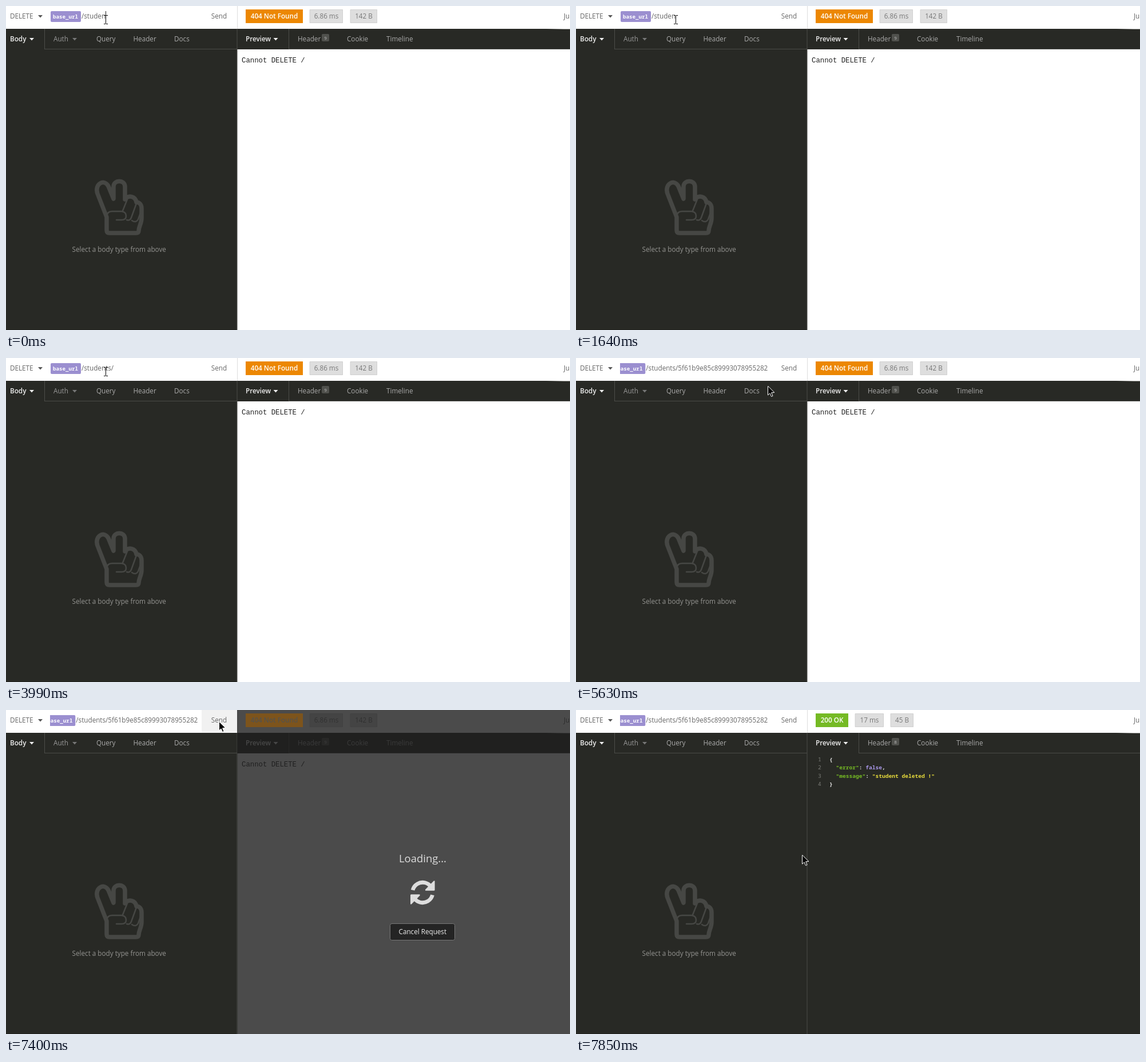
These frames come from a looping animation (986 px wide and 568 px high, 8000 ms). An HTML page with a canvas:

```html
<!DOCTYPE html>
<html lang="en">
<head>
<meta charset="utf-8">
<title>REST client: delete request</title>
<style>
html, body { margin: 0; width: 100%; height: 100%; overflow: hidden; background: #fff; }
canvas { display: block; }
</style>
</head>
<body>
<canvas id="stage" width="986" height="568"></canvas>
<script>
const ctx = document.getElementById('stage').getContext('2d');
const LOOP = 8000, SENT = 7400, DONE = 7850, PASTED = 4850;
const SANS = '"Open Sans", "Noto Sans", sans-serif';
const MONO = '"Noto Sans Mono", "DejaVu Sans Mono", monospace';
const UI = `11.7px ${SANS}`, UI_BOLD = `600 11.7px ${SANS}`;
const DARK = '#282925', LINE = '#4b4c48';

const typed = [
  [0, '/studen'], [2070, '/students'], [3550, '/students/'],
  [PASTED, '/students/5f61b9e85c89993078955282']
];
const caretOn = [
  [0, 620], [1050, 1640], [2070, 2650], [3110, 3990],
  [4850, 5330], [5780, 6380], [6810, 7400]
];
const pointer = [
  [0, 'beam', 171, 16], [5330, 'beam', 174, 13], [5480, 'beam', 193, 17],
  [5630, 'arrow', 335, 49], [5780, 'arrow', 360, 24], [5930, 'beam', 328, 16],
  [6080, 'beam', 295, 15], [6230, 'beam', 254, 15], [6380, 'beam', 227, 15],
  [6530, 'beam', 270, 18], [6680, 'beam', 316, 19], [6810, 'arrow', 355, 24],
  [6960, 'arrow', 372, 20], [7700, 'arrow', 366, 61], [DONE, 'arrow', 395, 254]
];
const sendShade = [
  [0, '#fff'], [5780, '#fafafa'], [5930, '#fff'], [6810, '#f9f9f9'],
  [6960, '#f1f1f1'], [7700, '#f5f5f5'], [DONE, '#fff']
];

const at = (track, t) => track.filter(step => step[0] <= t).pop();

function rect(x, y, w, h, color) {
  ctx.fillStyle = color;
  ctx.fillRect(x, y, w, h);
}

function text(s, x, y, color, font = UI) {
  ctx.font = font;
  ctx.fillStyle = color;
  ctx.fillText(s, x, y);
}

function centered(s, x, y, color, font) {
  ctx.textAlign = 'center';
  text(s, x, y, color, font);
  ctx.textAlign = 'left';
}

function rounded(x, y, w, h, r, fill, stroke) {
  ctx.beginPath();
  ctx.roundRect(x, y, w, h, r);
  ctx.fillStyle = fill;
  ctx.fill();
  if (stroke) {
    ctx.strokeStyle = stroke;
    ctx.lineWidth = 1;
    ctx.stroke();
  }
}

function polygon(points, color) {
  ctx.beginPath();
  points.forEach(([x, y]) => ctx.lineTo(x, y));
  ctx.closePath();
  ctx.fillStyle = color;
  ctx.fill();
}

function dropMark(x, y, color) {
  polygon([[x - 4, y - 2], [x + 4, y - 2], [x, y + 2.5]], color);
}

function strokePath(d, width, color) {
  ctx.lineWidth = width;
  ctx.strokeStyle = color;
  ctx.lineJoin = ctx.lineCap = 'round';
  ctx.stroke(new Path2D(d));
}

function drawHand() {
  const color = '#464744';
  strokePath('M176 370 L160 329 C154 312 172 302 179 316 L188 338 V317 ' +
    'C188 304 208 304 208 317 V339 C214 331 226 333 228 344 ' +
    'C234 344 237 349 237 355 V372 C237 382 232 386 232 394 Q232 398 227 398 ' +
    'H181 Q176 398 176 393 Z', 7.5, color);
  strokePath('M176 369 Q177 360 185 360 H202 Q210 361 210 368 Q210 375 202 375 H193', 2.5, color);
  strokePath('M212 339 L204 359 M228 346 L219 371 Q217 377 211 375', 2.5, color);
  strokePath('M237 357 L231 374 Q227 381 220 376', 2.5, color);
}

function drawRequest(t) {
  rect(0, 0, 404, 40, '#fff');
  rect(342, 0, 62, 39, at(sendShade, t)[1]);
  text('DELETE', 7, 22, '#666');
  dropMark(60, 18, '#555');
  centered('Send', 372.5, 22, '#666');

  const scroll = t >= PASTED ? 9.7 : 0, url = at(typed, t)[1];
  ctx.save();
  ctx.beginPath();
  ctx.rect(77, 0, 260, 40);
  ctx.clip();
  rounded(78 - scroll, 9, 53, 19, 2, '#9b8fd0');
  text('base_url', 82 - scroll, 22, '#fff', `600 9.2px ${MONO}`);
  text(url, 132 - scroll, 22, '#666');
  if (caretOn.some(([from, to]) => t >= from && t < to)) {
    const x = scroll ? 335 : Math.round(132 + ctx.measureText(url).width);
    rect(x, 9, 1, 17, '#222');
  }
  ctx.restore();

  rect(0, 40, 404, 528, DARK);
  rect(67, 40, 1, 35, LINE);
  rect(67, 75, 337, 1, LINE);
  text('Body', 7, 62, '#eee', UI_BOLD);
  dropMark(45, 58, '#eee');
  text('Auth', 83, 62, '#999');
  dropMark(120, 58, '#777');
  text('Query', 158, 62, '#aaa');
  text('Header', 222.5, 62, '#aaa');
  text('Docs', 294, 62, '#aaa');
  drawHand();
  centered('Select a body type from above', 197.7, 431, '#949491');
  rect(0, 567, 404, 1, '#20211e');
}

function badge(s, x, w, color = '#dedede', ink = '#777', font = UI) {
  rect(x, 6, w, 24, color);
  if (ink === '#777') {
    ctx.strokeStyle = '#d0d0d0';
    ctx.lineWidth = 1;
    ctx.strokeRect(x + .5, 6.5, w - 1, 23);
  }
  centered(s, x + w / 2, 22, ink, font);
}

function drawJson() {
  const font = `600 9.58px ${MONO}`, step = 5.75;
  const row = i => 90 + 14.3 * i;
  const code = (s, col, line, color) => text(s, 443 + col * step, row(line), color, font);
  for (let i = 0; i < 4; i++) text(i + 1, 423, row(i), '#7b7c77', `9.58px ${MONO}`);
  code('{', 0, 0, '#eee');
  code('"error"', 2, 1, '#75ba24');
  code(':', 9, 1, '#eee');
  code('false', 11, 1, '#a896e8');
  code(',', 16, 1, '#eee');
  code('"message"', 2, 2, '#75ba24');
  code(':', 11, 2, '#eee');
  code('"student deleted !"', 13, 2, '#e8dc3c');
  code('}', 0, 3, '#eee');
}

function drawResponse(done) {
  rect(404, 0, 582, 40, '#fff');
  rect(404, 0, 1, 40, '#ddd');
  if (done) {
    badge('200 OK', 419, 57, '#75ba24', '#fff', UI_BOLD);
    badge('17 ms', 488, 50);
    badge('45 B', 550, 40);
  } else {
    badge('404 Not Found', 419, 100, '#ec8702', '#fff', UI_BOLD);
    badge('6.86 ms', 531, 58);
    badge('142 B', 602, 47);
  }
  text('Ju', 975, 22, '#666');

  rect(404, 40, 582, 36, DARK);
  const glow = ctx.createLinearGradient(945, 0, 975, 0);
  glow.addColorStop(0, 'rgba(255,255,255,0)');
  glow.addColorStop(1, 'rgba(255,255,255,.5)');
  rect(945, 40, 41, 1, glow);
  text('Preview', 419, 62, '#eee', UI_BOLD);
  dropMark(471.5, 58, '#eee');
  rect(494, 40, 1, 35, LINE);
  text('Header', 510, 62, '#aaa');
  rounded(552, 49, 13, 13, 2, '#50514d');
  centered(done ? '8' : '9', 558.5, 58.5, '#bbb', `8px ${SANS}`);
  text('Cookie', 596, 62, '#aaa');
  text('Timeline', 665, 62, '#aaa');

  rect(404, 76, 582, 492, done ? DARK : '#fff');
  rect(494, 75, 492, 1, LINE);
  if (done) {
    drawJson();
    rect(404, 567, 582, 1, '#20211e');
  } else {
    text('Cannot DELETE /', 412, 99, '#222', '12.3px "Liberation Mono", monospace');
  }
  rect(403.5, 40, 1, 528, LINE);
}

function drawSpinner(angle) {
  ctx.save();
  ctx.translate(728.3, 320);
  ctx.rotate(angle);
  for (let half = 0; half < 2; half++) {
    ctx.beginPath();
    ctx.arc(0, 0, 17.7, -2.9, -.65);
    ctx.lineWidth = 6.8;
    ctx.lineCap = 'butt';
    ctx.strokeStyle = '#ddd';
    ctx.stroke();
    polygon([[21.3, -20.5], [21.3, -4], [20, -3.2], [5, -3.2], [4.5, -5], [19.5, -20.5]], '#ddd');
    ctx.rotate(Math.PI);
  }
  ctx.restore();
}

function drawLoading(t) {
  rect(404, 0, 582, 568, 'rgba(30,30,30,.8)');
  badge('404 Not Found', 419, 100, '#7d541c', '#55524b', UI_BOLD);
  centered('Loading...', 728.5, 267, '#ddd', `18.4px ${SANS}`);
  // The spinner turns once in two seconds, sampled every 150 ms.
  drawSpinner(Math.floor((t - SENT) / 150) * .15 * Math.PI);
  rounded(671.5, 374.5, 113, 29, 3, '#242424', '#777');
  centered('Cancel Request', 728.3, 393, '#eee');
}

function drawPointer([, kind, x, y]) {
  if (kind === 'beam') {
    rect(x + 3, y + 1, 1, 14, '#000');
    for (const edge of [y, y + 15]) {
      rect(x, edge, 3, 1, '#000');
      rect(x + 4, edge, 3, 1, '#000');
    }
    return;
  }
  ctx.save();
  ctx.translate(x, y);
  polygon([[.5, .5], [.5, 16], [4, 12.8], [6.5, 18.5], [9, 17.5], [6.6, 11.8], [11.5, 11.5]], '#000');
  ctx.strokeStyle = '#fff';
  ctx.lineWidth = 1;
  ctx.lineJoin = 'miter';
  ctx.stroke();
  ctx.restore();
}

function draw(t) {
  drawRequest(t);
  drawResponse(t >= DONE);
  if (t >= SENT && t < DONE) drawLoading(t);
  drawPointer(at(pointer, t));
}

const start = performance.now();
function tick() {
  draw((performance.now() - start) % LOOP);
  requestAnimationFrame(tick);
}
tick();
</script>
</body>
</html>
```
